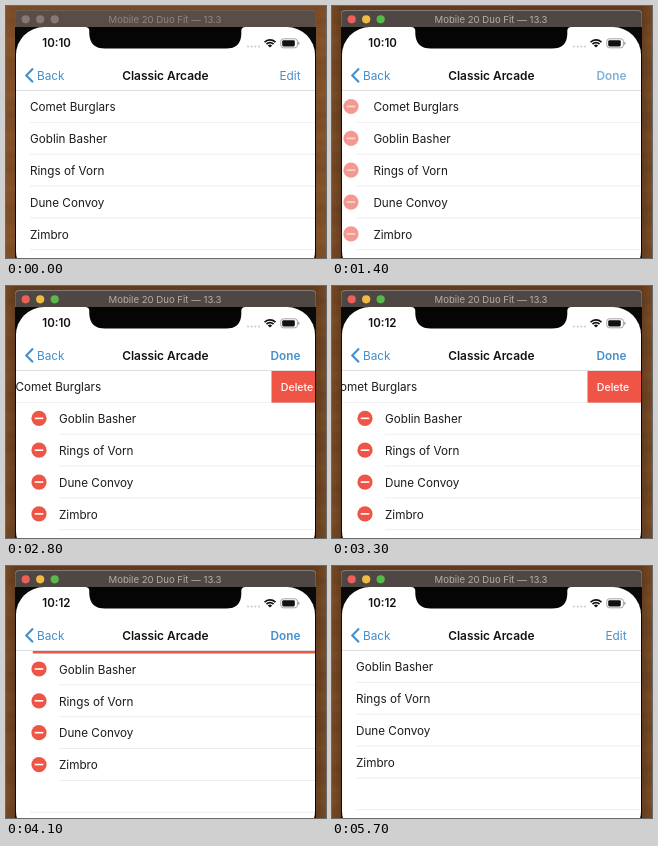
Animation, 320 px wide and 252 px high, one loop 6200 ms. Source, as an HTML page with a canvas:

```html
<!DOCTYPE html>
<html lang="en">
<head>
<meta charset="utf-8">
<title>Edit list</title>
<style>
html, body { margin: 0; width: 100%; height: 100%; overflow: hidden; background: #7a4c28; }
canvas { display: block; width: 320px; height: 252px; }
</style>
</head>
<body>
<canvas id="stage"></canvas>
<script>
const W = 320, H = 252, LOOP = 6200, STEP = 100;
const LEFT = 10, RIGHT = 309, BAR = 21, TOP = 85, ROW = 31.85;
const BLUE = '#468ecb', RED = '#ef5546', INK = '#1b1b1b', LINE = '#e9e9eb';
const FONT = 'Inter, "Open Sans", sans-serif';
const GAMES = ['Comet Burglars', 'Goblin Basher', 'Rings of Vorn', 'Dune Convoy', 'Zimbro'];

const canvas = document.getElementById('stage');
const ctx = canvas.getContext('2d');
const scale = window.devicePixelRatio || 1;
canvas.width = W * scale;
canvas.height = H * scale;

const span = (t, start, length) => Math.min(1, Math.max(0, (t - start) / length));
const smooth = x => x * x * (3 - 2 * x);
const easeOut = (x, power) => 1 - Math.pow(1 - x, power);

function rect(x, y, w, h, color) {
  ctx.fillStyle = color;
  ctx.fillRect(x, y, w, h);
}

function rounded(x, y, w, h, r, color) {
  ctx.fillStyle = color;
  ctx.beginPath();
  ctx.roundRect(x, y, w, h, r);
  ctx.fill();
}

function disc(x, y, r, color) {
  ctx.fillStyle = color;
  ctx.beginPath();
  ctx.arc(x, y, r, 0, Math.PI * 2);
  ctx.fill();
}

function label(str, x, y, size, color, weight = 400, align = 'left') {
  ctx.font = `${weight} ${size}px ${FONT}`;
  ctx.textAlign = align;
  ctx.fillStyle = color;
  ctx.fillText(str, x, y);
}

function stroke(points, color, width) {
  ctx.strokeStyle = color;
  ctx.lineWidth = width;
  ctx.beginPath();
  points.forEach(([x, y]) => ctx.lineTo(x, y));
  ctx.stroke();
}

function desk(active) {
  rect(0, 0, W, H, '#945e31');
  for (let y = 0; y < H; y += 2) {
    const grain = Math.sin(y * 0.13) + Math.sin(y * 0.47 + 1) * 0.6;
    rect(0, y, W, 2, `rgba(60,30,8,${0.1 + 0.05 * grain})`);
  }
  const dark = active ? 0.38 : 0.16;
  const shade = ctx.createLinearGradient(0, 0, W, 0);
  shade.addColorStop(0, `rgba(35,20,10,${dark * 0.5})`);
  shade.addColorStop(0.03, `rgba(35,20,10,${dark})`);
  shade.addColorStop(0.97, `rgba(35,20,10,${dark})`);
  shade.addColorStop(1, `rgba(35,20,10,${dark * 0.5})`);
  rect(0, 0, W, H, shade);
}

function windowBar(active) {
  rounded(9, 4, 301, 30, 4, active ? '#857b76' : '#6b5c54');
  rounded(9.5, 5, 300, 30, 4, active ? '#4f4744' : '#594d48');
  const lights = active ? ['#ee5f58', '#efbb45', '#58b94b'] : ['#87796f', '#87796f', '#87796f'];
  lights.forEach((color, i) => disc(19.7 + i * 14.5, 13.3, 4.1, color));
  label('Mobile 20 Duo Fit — 13.3', 159, 16.8, 9.6, active ? '#b5adaa' : '#8f8581', 400, 'center');
}

function screen() {
  rect(9, BAR, 301, H - BAR, '#0a0a0a');
  rounded(LEFT, BAR, RIGHT - LEFT, H, 28, '#fff');
}

function notch() {
  ctx.fillStyle = '#050505';
  ctx.beginPath();
  ctx.moveTo(79, BAR);
  ctx.quadraticCurveTo(83.3, BAR, 83.3, 25);
  ctx.lineTo(83.3, 28);
  ctx.quadraticCurveTo(84, 42.6, 99, 42.6);
  ctx.lineTo(220, 42.6);
  ctx.quadraticCurveTo(235, 42.6, 235.3, 28);
  ctx.lineTo(235.3, 25);
  ctx.quadraticCurveTo(235.3, BAR, 239.5, BAR);
  ctx.fill();
}

function statusBar(clock) {
  label(clock, 36.3, 41.4, 11.5, '#111', 600);
  for (let i = 0; i < 4; i++) disc(242 + i * 3.7, 40.6, 1, '#c8c8ca');

  ctx.strokeStyle = '#111';
  ctx.lineWidth = 1.7;
  for (const r of [7.5, 4.8]) {
    ctx.beginPath();
    ctx.arc(264, 41.4, r, -Math.PI * 0.76, -Math.PI * 0.24);
    ctx.stroke();
  }
  ctx.fillStyle = '#111';
  ctx.beginPath();
  ctx.moveTo(264, 41.6);
  ctx.arc(264, 41.6, 3, -Math.PI * 0.76, -Math.PI * 0.24);
  ctx.fill();

  ctx.strokeStyle = '#8d8d8d';
  ctx.lineWidth = 0.8;
  ctx.beginPath();
  ctx.roundRect(274.8, 32.8, 16.6, 9, 2.5);
  ctx.stroke();
  rounded(276.2, 34.2, 12.6, 6.2, 1.3, '#111');
  rect(292.2, 35.9, 1.1, 2.8, '#8d8d8d');
}

function navBar(t) {
  stroke([[27, 62.5], [20.3, 69.4], [27, 76.3]], BLUE, 2.1);
  label('Back', 31, 73.7, 11.8, BLUE);
  label('Classic Arcade', 159.3, 73.6, 11.9, '#111', 600, 'center');

  const editing = t >= 1100 && t < 4900;
  if (t >= 1100) ctx.globalAlpha = editing ? span(t, 980, 600) : span(t, 4890, 600);
  label(editing ? 'Done' : 'Edit', 294.5, 73.7, 11.8, BLUE, editing ? 600 : 400, 'right');
  ctx.globalAlpha = 1;
  rect(LEFT, 84, RIGHT - LEFT, 0.7, '#d2d2d5');
}

function minus(x, y, alpha) {
  ctx.globalAlpha = alpha;
  disc(x, y, 7.6, RED);
  rect(x - 4.3, y - 0.8, 8.6, 1.6, '#fff');
  ctx.globalAlpha = 1;
}

function divider(x, bottom) {
  rect(x, bottom - 0.9, RIGHT - x, 0.8, LINE);
}

function row(name, y, edit, shift) {
  if (edit > 0) minus(-2 + 35 * edit - shift, y + 15.5, edit);
  label(name, 24 + 29 * edit - shift, y + 20.3, 11.7, INK);
  divider((edit < 1 ? 24 : 53) - shift, y + ROW);
}

function list(t) {
  const edit = smooth(span(t, 1060, 600)) * (1 - smooth(span(t, 4970, 530)));
  const swipe = easeOut(span(t, 2500, 700), 3);
  const gone = easeOut(span(t, 3900, 500), 5);
  const first = ROW * (1 - gone);

  ctx.save();
  ctx.beginPath();
  ctx.rect(LEFT, TOP, RIGHT - LEFT, H - TOP);
  ctx.clip();

  if (gone < 1) {
    ctx.save();
    ctx.beginPath();
    ctx.rect(LEFT, TOP, RIGHT - LEFT, first);
    ctx.clip();
    const shift = 53.5 * swipe + 248 * gone;
    row(GAMES[0], TOP, edit, shift);
    if (swipe > 0) {
      const edge = RIGHT - shift;
      rect(edge, TOP, shift, ROW, RED);
      label('Delete', edge + 9.3, TOP + 19.6, 10.6, '#fff', 500);
    }
    ctx.restore();
  }
  for (let i = 1; i < GAMES.length; i++) {
    row(GAMES[i], TOP + first + (i - 1) * ROW, edit, 0);
  }
  divider(24, TOP + first + 5 * ROW);
  ctx.restore();
}

function draw(now) {
  const t = Math.floor((now % LOOP) / STEP) * STEP;
  const active = t >= 1100;
  ctx.setTransform(scale, 0, 0, scale, 0, 0);
  desk(active);
  windowBar(active);
  screen();
  notch();
  statusBar(t < 3300 ? '10:10' : '10:12');
  list(t);
  navBar(t);
  requestAnimationFrame(draw);
}
requestAnimationFrame(draw);
</script>
</body>
</html>
```
